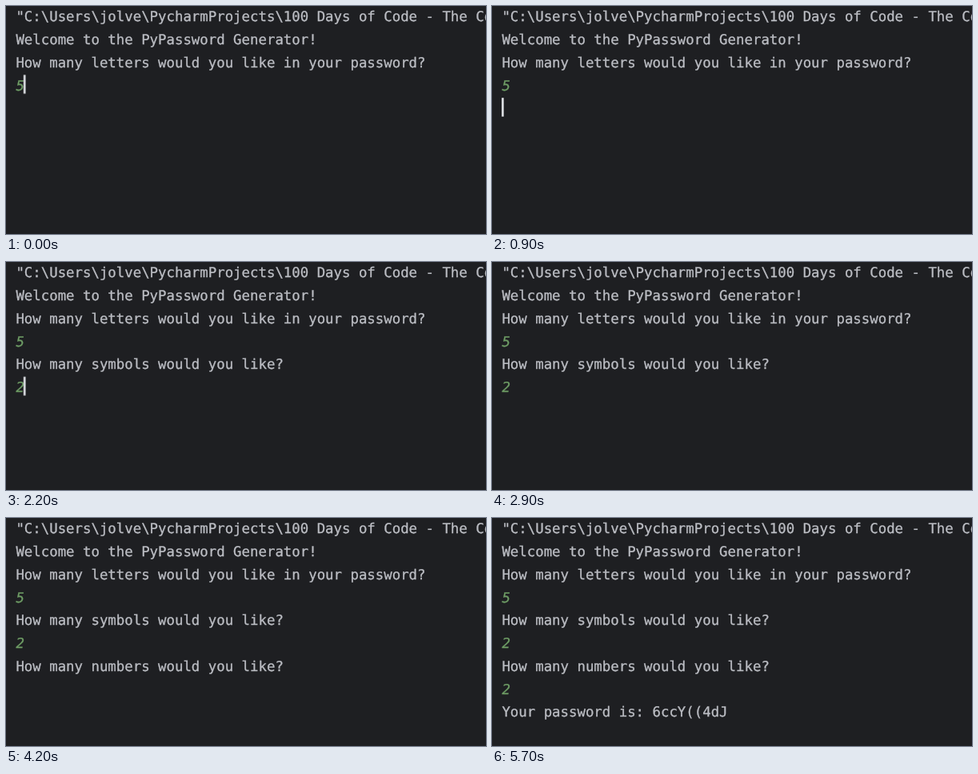
Animation, 600 px wide and 286 px high, one loop 5800 ms. Source, as an HTML page:

```html
<!DOCTYPE html>
<html lang="en">
<head>
<meta charset="utf-8">
<title>Password generator console</title>
<style>
  html, body { margin: 0; width: 100%; height: 100%; overflow: hidden; background: #1e1f22; }
  svg { display: block; width: 600px; height: 286px; }
  text {
    font: 17.37px "DejaVu Sans Mono", "Noto Sans Mono", monospace;
    fill: #bcbec4;
    stroke: #bcbec4;
    stroke-width: 0.3px;
    text-rendering: geometricPrecision;
    white-space: pre;
  }
  .input { fill: #6f9e66; stroke: #6f9e66; font-style: italic; }
  .late, #caret { animation: 5.8s step-end infinite; }
  #caret { fill: #dfe1e5; animation-name: caret; }

  #symbols { animation-name: symbols; }
  #symbolCount { animation-name: symbolCount; }
  #numbers { animation-name: numbers; }
  #numberCount { animation-name: numberCount; }
  #result { animation-name: result; }

  @keyframes symbols     { 0% { opacity: 0 } 17.24%, 100% { opacity: 1 } }
  @keyframes symbolCount { 0% { opacity: 0 } 34.48%, 100% { opacity: 1 } }
  @keyframes numbers     { 0% { opacity: 0 } 56.89%, 100% { opacity: 1 } }
  @keyframes numberCount { 0% { opacity: 0 } 75.86%, 100% { opacity: 1 } }
  @keyframes result      { 0% { opacity: 0 } 96.55%, 100% { opacity: 1 } }

  /* translate(column, row * line height); opacity is the blink */
  @keyframes caret {
    0%     { opacity: 1; transform: translate(9.8px, calc(3 * 28.75px)) }
    8.62%  { opacity: 0; transform: translate(9.8px, calc(3 * 28.75px)) }
    13.79% { opacity: 1; transform: translate(0px, calc(4 * 28.75px)) }
    17.24% { opacity: 1; transform: translate(0px, calc(5 * 28.75px)) }
    25.86% { opacity: 0; transform: translate(0px, calc(5 * 28.75px)) }
    34.48% { opacity: 1; transform: translate(9.8px, calc(5 * 28.75px)) }
    43.1%  { opacity: 0; transform: translate(9.8px, calc(5 * 28.75px)) }
    51.72% { opacity: 1; transform: translate(9.8px, calc(5 * 28.75px)) }
    53.44% { opacity: 1; transform: translate(0px, calc(6 * 28.75px)) }
    56.89% { opacity: 1; transform: translate(0px, calc(7 * 28.75px)) }
    67.24% { opacity: 0; transform: translate(0px, calc(7 * 28.75px)) }
    75.86% { opacity: 1; transform: translate(9.8px, calc(7 * 28.75px)) }
    86.2%  { opacity: 0; transform: translate(9.8px, calc(7 * 28.75px)) }
    93.1%  { opacity: 1; transform: translate(0px, calc(8 * 28.75px)) }
    96.55%, 100% { opacity: 0; transform: translate(0px, calc(8 * 28.75px)) }
  }
</style>
</head>
<body>
<svg viewBox="0 0 600 286">
  <text x="12.4" y="19.4">"C:\Users\jolve\PycharmProjects\100 Days of Code - The Co</text>
  <text x="12.4" y="48.15">Welcome to the PyPassword Generator!</text>
  <text x="12.4" y="76.9">How many letters would you like in your password?</text>
  <text x="12.4" y="105.65" class="input">5</text>
  <text x="12.4" y="134.4" class="late" id="symbols">How many symbols would you like?</text>
  <text x="12.4" y="163.15" class="input late" id="symbolCount">2</text>
  <text x="12.4" y="191.9" class="late" id="numbers">How many numbers would you like?</text>
  <text x="12.4" y="220.65" class="input late" id="numberCount">2</text>
  <text x="12.4" y="249.4" class="late" id="result">Your password is: 6ccY((4dJ</text>
  <rect id="caret" x="12.1" y="0.2" width="2.6" height="23.5"/>
</svg>
</body>
</html>
```
